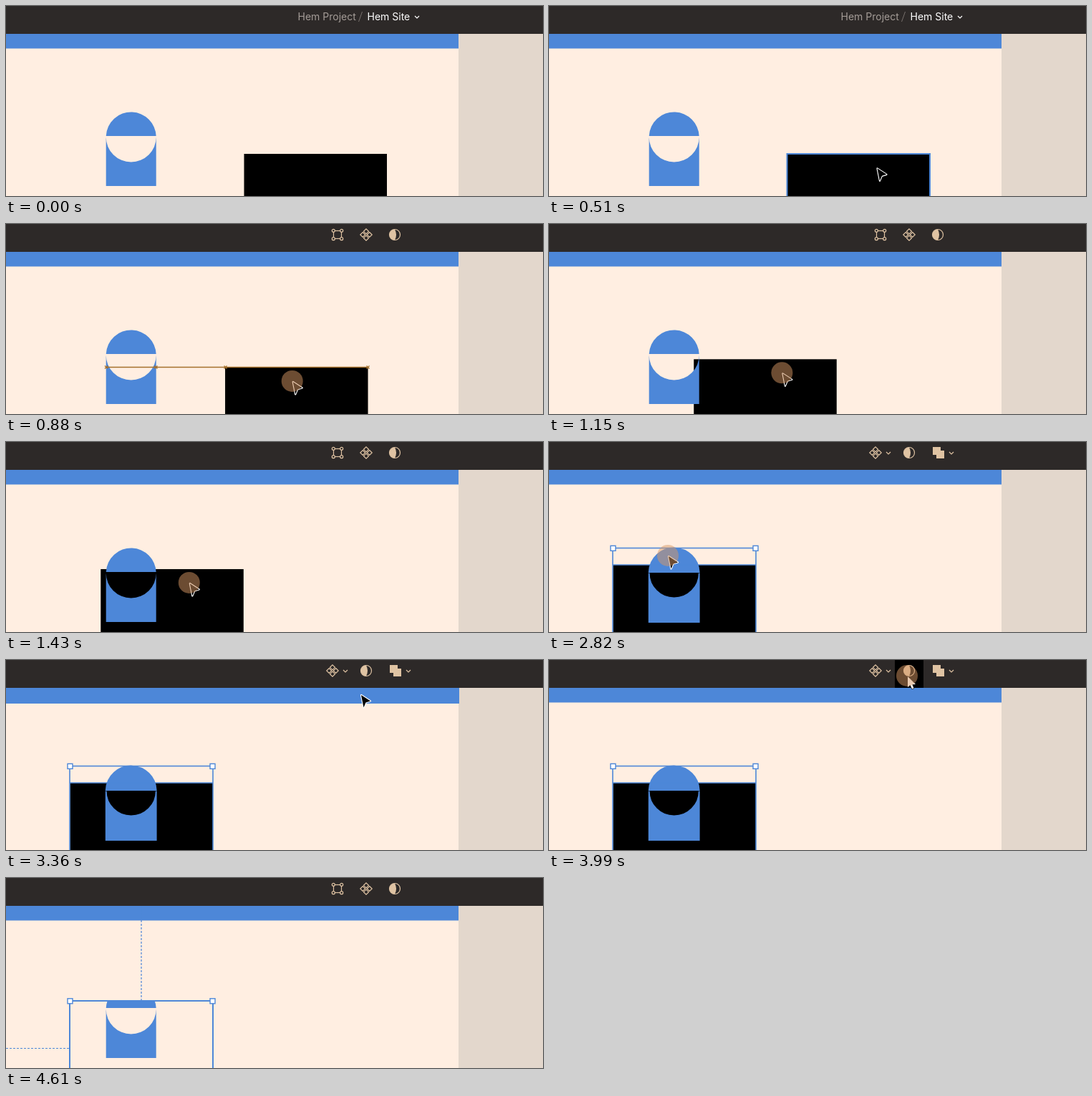
An HTML page with a canvas for the animation above (4940 ms loop, 750 by 266 pixels).

```html
<!DOCTYPE html>
<html lang="en">
<head>
<meta charset="utf-8">
<title>Masking a shape</title>
<style>
  html, body { margin: 0; width: 100%; height: 100%; overflow: hidden; background: #ffeee1; }
  canvas { display: block; }
</style>
</head>
<body>
<canvas id="stage" width="750" height="266"></canvas>
<script>
const ctx = document.getElementById('stage').getContext('2d');
const LOOP = 4940;
const BLUE = '#4d87d8', CREAM = '#ffeee1', BAR = '#2d2928', TAN = '#dfc3a3', GUIDE = '#a4702c';
const BOX_W = 199.5, BOX_H = 150;

// Moments at which the interface changes, in ms
const PRESS = 575, DROP = 1640, ADD = 2820, MASK = 4090;

// [time, x, y, eased arrival]
const cursorKeys = [
  [40, 608, 264], [540, 457, 227, 1], [600, 455, 227], [880, 401, 221], [1060, 349, 213],
  [1430, 257, 198], [1620, 214, 192], [1700, 212, 191], [2090, 172.5, 169, 1], [2170, 169, 169],
  [2220, 169, 169], [2240, 169, 167], [2410, 169, 167], [2580, 167, 160, 1], [2930, 167, 160],
  [3300, 496, 49, 1], [3360, 496, 49], [3820, 501, 23, 1], [4090, 501, 23],
  [4410, 635, 208, 1], [4610, 690, 270]
];
const boxKeys = [
  [600, 332.5, 207], [880, 306.5, 200.5], [1060, 225, 193],
  [1430, 132.5, 178], [1600, 95, 173], [1650, 89.5, 172]
];

function track(keys, t) {
  if (t <= keys[0][0]) return { x: keys[0][1], y: keys[0][2] };
  for (let i = 1; i < keys.length; i++) {
    const [t0, x0, y0] = keys[i - 1], [t1, x1, y1, eased] = keys[i];
    if (t > t1) continue;
    let k = (t - t0) / (t1 - t0);
    if (eased) k = k * k * (3 - 2 * k);
    return { x: x0 + (x1 - x0) * k, y: y0 + (y1 - y0) * k };
  }
  const last = keys[keys.length - 1];
  return { x: last[1], y: last[2] };
}

const between = (t, from, to) => t >= from && t < to;

function fillRect(color, x, y, w, h) {
  ctx.fillStyle = color;
  ctx.fillRect(x, y, w, h);
}

function strokeRect(x, y, w, h, width = 2) {
  ctx.strokeStyle = BLUE;
  ctx.lineWidth = width;
  ctx.strokeRect(x, y, w, h);
}

function line(color, width, ...points) {
  ctx.strokeStyle = color;
  ctx.lineWidth = width;
  ctx.beginPath();
  points.forEach(([x, y]) => ctx.lineTo(x, y));
  ctx.stroke();
}

function circle(x, y, r) {
  ctx.beginPath();
  ctx.arc(x, y, r, 0, 7);
}

// A dome above a block with a round bite
function badge(outlined) {
  const cx = 174.7, cy = 183.5, r = 35, tilt = Math.asin(1.5 / r);
  ctx.beginPath();
  ctx.arc(cx, cy, r, Math.PI + tilt, -tilt);
  ctx.closePath();
  ctx.moveTo(cx + r, cy);
  ctx.arc(cx, cy, r, 0, Math.PI);
  ctx.lineTo(cx - r, 252);
  ctx.lineTo(cx + r, 252);
  ctx.closePath();
  ctx.fillStyle = BLUE;
  ctx.fill();
  if (outlined) {
    ctx.strokeStyle = BLUE;
    ctx.lineWidth = 1.8;
    ctx.stroke();
  }
}

function handle(x, y) {
  fillRect('#fff', x - 3.5, y - 3.5, 7, 7);
  strokeRect(x - 3.5, y - 3.5, 7, 7, 1.4);
}

function selection(top, width) {
  strokeRect(89, top, 200, 200, width);
  handle(89.5, top + 0.3);
  handle(288.5, top + 0.3);
}

function distances() {
  ctx.setLineDash([3, 2]);
  line(BLUE, 1.2, [189, 39], [189, 171]);
  line(BLUE, 1.2, [0, 238.5], [88, 238.5]);
  ctx.setLineDash([]);
}

function radiusDots() {
  for (const x of [102, 276]) {
    circle(x, 185, 4.2);
    ctx.fillStyle = '#fff';
    ctx.fill();
    ctx.strokeStyle = BLUE;
    ctx.lineWidth = 1.4;
    ctx.stroke();
  }
}

function alignmentGuide(box) {
  const y = 200.5;
  line(GUIDE, 1.3, [140, y], [box.x + BOX_W, y]);
  for (const x of [140, 209.5, box.x + 0.5, box.x + BOX_W]) {
    line(GUIDE, 1.2, [x - 2, y - 2], [x + 2, y + 2]);
    line(GUIDE, 1.2, [x - 2, y + 2], [x + 2, y - 2]);
  }
}

const chevron = (x, y, color) => line(color, 1.2, [x - 3, y - 1.5], [x, y + 1.5], [x + 3, y - 1.5]);

function editIcon(x, y) {
  ctx.strokeStyle = TAN;
  ctx.lineWidth = 1.2;
  ctx.strokeRect(x - 5.5, y - 5.5, 11, 11);
  for (const dx of [-5.7, 5.7]) for (const dy of [-5.7, 5.7]) {
    circle(x + dx, y + dy, 2);
    ctx.fillStyle = BAR;
    ctx.fill();
    ctx.stroke();
  }
}

function componentIcon(x, y) {
  const r = 3.5;
  for (const [dx, dy] of [[0, -4.7], [4.7, 0], [0, 4.7], [-4.7, 0]]) {
    const cx = x + dx, cy = y + dy;
    line(TAN, 1.2, [cx, cy - r], [cx + r, cy], [cx, cy + r], [cx - r, cy], [cx, cy - r], [cx + r, cy]);
  }
}

function maskIcon(x, y) {
  circle(x, y, 7.5);
  ctx.strokeStyle = TAN;
  ctx.lineWidth = 1.2;
  ctx.stroke();
  ctx.beginPath();
  ctx.arc(x, y, 7.5, Math.PI * 1.5, Math.PI * 0.5, true);
  ctx.quadraticCurveTo(x + 4, y, x, y - 7.5);
  ctx.fillStyle = TAN;
  ctx.fill();
}

function unionIcon(x, y) {
  fillRect(TAN, x - 8, y - 8, 11, 11);
  fillRect(TAN, x - 3, y - 3, 11, 11);
}

function toolbar(t, cursor) {
  fillRect(BAR, 0, 0, 750, 39);
  if (t < PRESS) {
    ctx.font = '14px Inter, sans-serif';
    ctx.fillStyle = '#a49c97';
    ctx.fillText('Hem Project', 407.5, 20);
    line('#77706c', 1, [492.5, 22], [497.5, 8]);
    ctx.fillStyle = '#fff';
    ctx.fillText('Hem Site', 504.5, 20);
    chevron(574, 15.5, '#fff');
  } else if (between(t, ADD, MASK)) {
    if (cursor.y < 39) fillRect('#000', 483, 0, 40, 39);
    componentIcon(456, 15);
    chevron(474, 15.5, TAN);
    maskIcon(503, 15);
    unionIcon(544, 15);
    chevron(562, 15.5, TAN);
  } else {
    editIcon(463, 15);
    componentIcon(503, 15);
    maskIcon(543, 15);
  }
}

function pointerShape(points, fill, stroke, width) {
  ctx.beginPath();
  points.forEach(([x, y]) => ctx.lineTo(x, y));
  ctx.closePath();
  ctx.lineJoin = 'round';
  ctx.strokeStyle = stroke;
  ctx.lineWidth = width;
  ctx.stroke();
  ctx.fillStyle = fill;
  ctx.fill();
  ctx.lineJoin = 'miter';
}

function pointer(t, { x, y }) {
  ctx.save();
  ctx.translate(x, y);
  if (between(t, 2050, 2410)) {
    const half = [[0, -7.5], [3.5, -3.5], [1, -3.5], [1, 3.5], [3.5, 3.5], [0, 7.5]];
    const mirrored = half.slice(1, -1).reverse().map(([px, py]) => [-px, py]);
    pointerShape([...half, ...mirrored], '#000', '#fff', 2);
  } else if (y < 39) {
    pointerShape([[0, 0], [0, 15], [3.5, 12], [6, 17.5], [8.5, 16.5], [6.3, 11.3], [11, 11]],
      '#fff', '#000', 1.2);
  } else {
    pointerShape([[0, 0], [13, 8.5], [6.5, 10.5], [3.5, 17.5]], '#000', '#fff', 2.2);
  }
  ctx.restore();
}

function pressMark({ x, y }) {
  circle(x - 1, y - 1, 15);
  ctx.fillStyle = 'rgba(216, 152, 100, 0.5)';
  ctx.fill();
}

function draw(t) {
  const cursor = track(cursorKeys, t), box = track(boxKeys, t);
  const masked = t >= MASK;

  fillRect(CREAM, 0, 0, 632, 266);
  fillRect('#e3d7cc', 632, 0, 118, 266);
  fillRect(BLUE, 0, 39, 632, 20.5);

  ctx.save();
  if (masked) {
    ctx.beginPath();
    ctx.rect(box.x, box.y, BOX_W, BOX_H);
    ctx.clip();
  } else {
    fillRect('#000', box.x, box.y, BOX_W, BOX_H);
  }
  badge(between(t, 2430, MASK));
  ctx.restore();

  if (t < PRESS && cursor.x < box.x + BOX_W) strokeRect(box.x, box.y, BOX_W, BOX_H);
  if (between(t, 830, 930)) alignmentGuide(box);
  if (between(t, DROP, ADD) || masked) {
    distances();
    selection(172, 2);
  }
  if (between(t, DROP, ADD)) radiusDots();
  if (between(t, ADD, MASK)) {
    line(BLUE, 1.6, [89, 172], [289, 172]);
    selection(148.5, 1.6);
    if (between(cursor.y, 39, 60)) strokeRect(-2, 39, 634, 21);
  }

  toolbar(t, cursor);
  if (between(t, 40, 4610)) pointer(t, cursor);
  if (between(t, PRESS, DROP) || between(t, ADD, 2940) || between(t, 3900, MASK)) pressMark(cursor);
}

const start = performance.now();
function frame() {
  draw((performance.now() - start) % LOOP);
  requestAnimationFrame(frame);
}
frame();
</script>
</body>
</html>
```
